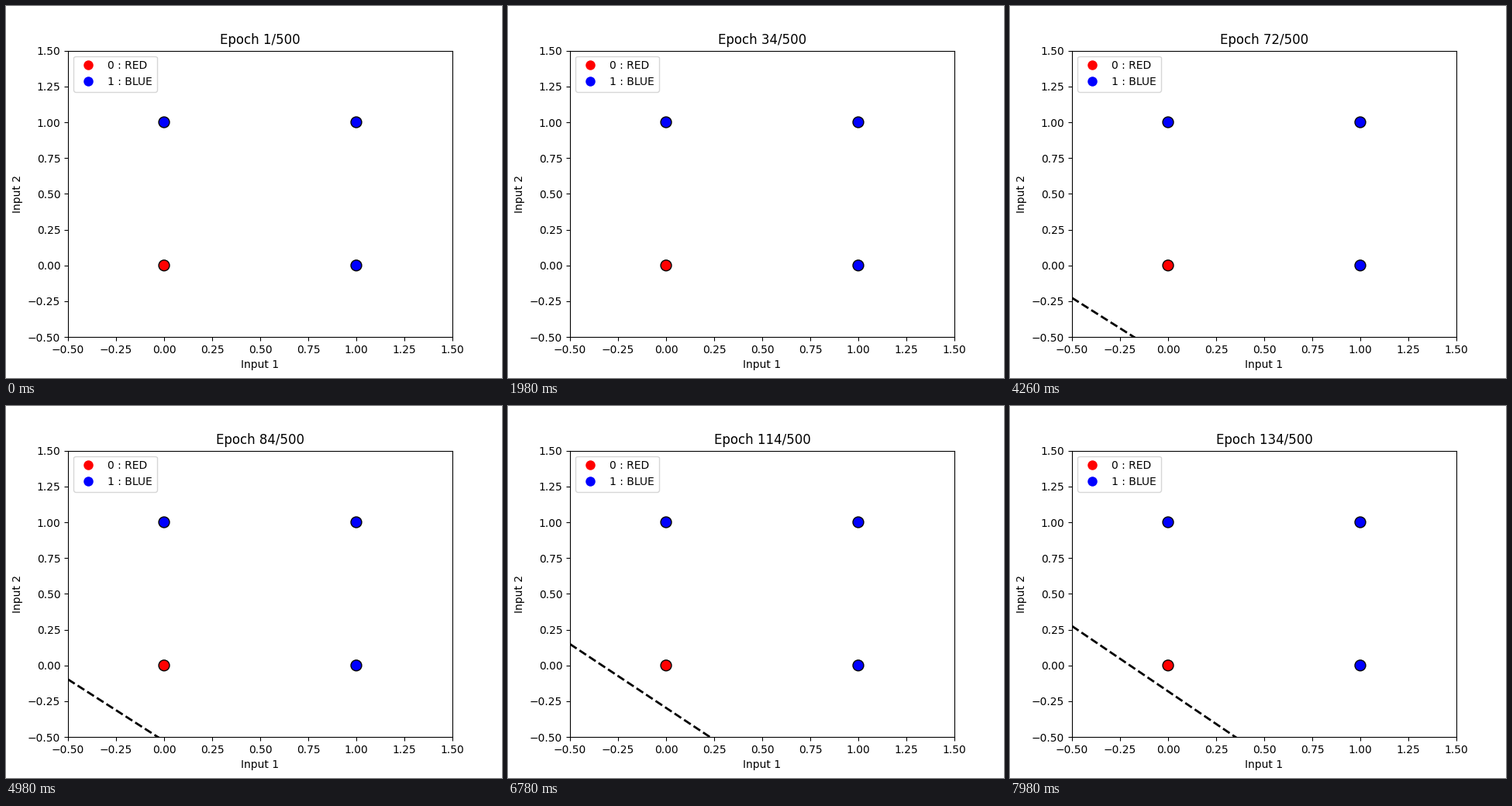
A matplotlib script for the animation above (8 s loop, 640 by 480 pixels).

```python
import math

import matplotlib.pyplot as plt
import numpy as np
from matplotlib.animation import FuncAnimation
from matplotlib.lines import Line2D

LOOP_MS = 8000
FRAMES = 134
EPOCHS = 500
LOW, HIGH = -0.5, 1.5

plt.rcParams["font.family"] = "DejaVu Sans"

fig, ax = plt.subplots(figsize=(6.4, 4.8), dpi=100)
ax.set_xlim(LOW, HIGH)
ax.set_ylim(LOW, HIGH)
ax.set_xlabel("Input 1")
ax.set_ylabel("Input 2")
title = ax.set_title("")

# The four inputs of a logical OR, coloured by their output
points = np.array([(0, 0), (0, 1), (1, 0), (1, 1)])
colors = ["red" if not a | b else "blue" for a, b in points]
ax.scatter(points[:, 0], points[:, 1], s=100, c=colors, edgecolors="k")

boundary, = ax.plot([], [], "k--", lw=2)


def legend_dot(color, label):
    return Line2D([0], [0], marker="o", color="w", markerfacecolor=color,
                  markersize=10, label=label)


ax.legend(handles=[legend_dot("red", "0 : RED"),
                   legend_dot("blue", "1 : BLUE")], loc="upper left")


def decision_line(step):
    """Height at the left edge and slope of the boundary after a step."""
    u = math.log(max(step, 1) / 100)
    left = 0.053 + 0.795 * u - 0.058 * u * u
    slope = -(0.835 + 0.001 * (step - 57))
    return left, slope


def update(step):
    left, slope = decision_line(step)
    boundary.set_data([LOW, HIGH], [left, left + slope * (HIGH - LOW)])
    title.set_text(f"Epoch {step + 1}/{EPOCHS}")
    return boundary, title


anim = FuncAnimation(fig, update, frames=FRAMES, interval=LOOP_MS / FRAMES,
                     init_func=lambda: update(0), repeat=True, repeat_delay=0)
plt.show()
```
